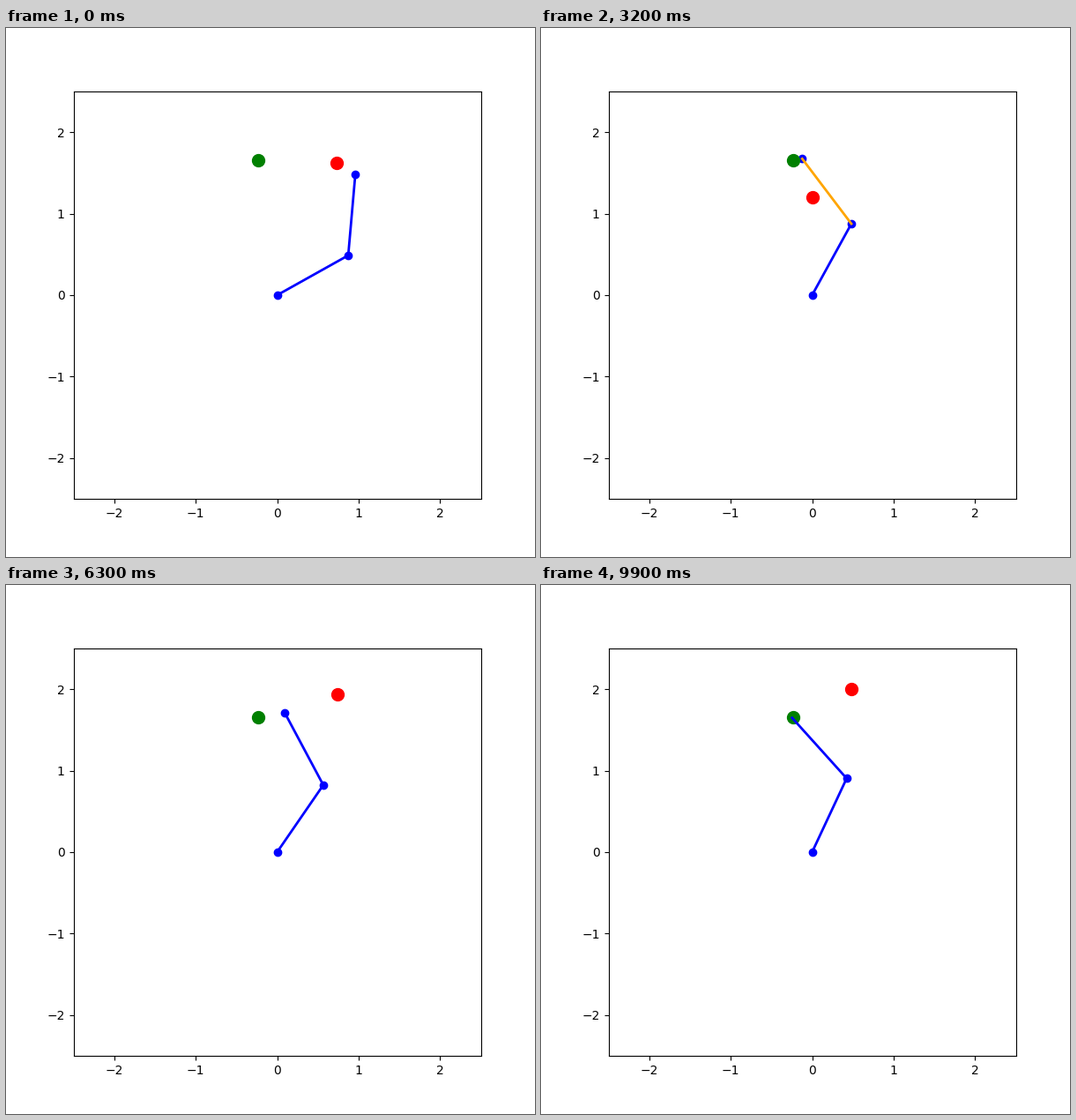
Write a matplotlib script that moves like this. It is 600 px wide and 600 px high and loops after 10 s.

```python
import numpy as np
import matplotlib.pyplot as plt
from matplotlib.animation import FuncAnimation

FRAMES = 100
GAIN = 0.1           # share of the remaining error closed per step
SAFE_DIST = 0.2      # links closer than this to the obstacle turn orange
GOAL = (-0.233, 1.653)
START_POSE = np.array([29.2, 55.8])
GOAL_POSE = np.array([64.5, 67.1])

# the obstacle drives the arm off course: first step, last step, pose reached
PUSHES = [
    (0, 4, (30.8, 53.7)),
    (27, 32, (61.2, 65.9)),
    (32, 48, (45.7, 55.5)),
    (48, 54, (41.2, 55.5)),
    (76, 82, (67.0, 67.2)),
]

# step and position where the wandering obstacle changes direction
TURNS = np.array([
    (0, 0.730, 1.623), (17, 0.005, 1.003), (32, 0.003, 1.20),
    (48, 0.352, 1.678), (59, 0.88, 2.0), (63, 0.741, 1.937),
    (76, 0.137, 1.667), (82, 0.04, 1.60), (99, 0.482, 2.0),
])


def next_pose(pose, i):
    for first, last, reached in PUSHES:
        if first <= i < last:
            return pose + (np.array(reached) - pose) / (last - i)
    return pose + GAIN * (GOAL_POSE - pose)


def arm_angles():
    poses = [START_POSE]
    for i in range(FRAMES - 1):
        poses.append(next_pose(poses[-1], i))
    return np.radians(poses)


def obstacle_path():
    steps, turns = np.arange(FRAMES), TURNS[:, 0]
    path = np.column_stack([np.interp(steps, turns, xy) for xy in TURNS[:, 1:].T])
    jitter = np.random.default_rng(3).uniform(-0.02, 0.02, path.shape)
    jitter[turns.astype(int)] = 0
    return np.clip(path + jitter, (0, 1), (1, 2))


def arm_points(q):
    heading = np.cumsum(q)
    links = np.column_stack([np.cos(heading), np.sin(heading)])
    return np.vstack([(0, 0), np.cumsum(links, axis=0)])


def segment_dist(p, a, b):
    d = b - a
    t = np.clip(np.dot(p - a, d) / np.dot(d, d), 0, 1)
    return np.hypot(*(a + t * d - p))


angles = arm_angles()
obstacles = obstacle_path()

fig, ax = plt.subplots(figsize=(6, 6), dpi=100)
ax.set_xlim(-2.5, 2.5)
ax.set_ylim(-2.5, 2.5)
ax.set_aspect("equal")

joints, = ax.plot([], [], "bo")
ax.plot(*GOAL, "go", markersize=10)
obstacle, = ax.plot([], [], "ro", markersize=10)
links = [ax.plot([], [], "b-", lw=2)[0] for _ in range(2)]


def update(i):
    pts, obs = arm_points(angles[i]), obstacles[i]
    joints.set_data(pts[:, 0], pts[:, 1])
    obstacle.set_data([obs[0]], [obs[1]])
    for link, a, b in zip(links, pts, pts[1:]):
        link.set_data([a[0], b[0]], [a[1], b[1]])
        link.set_color("orange" if segment_dist(obs, a, b) < SAFE_DIST else "blue")
    return joints, obstacle, *links


anim = FuncAnimation(fig, update, frames=FRAMES, interval=100,
                     init_func=lambda: update(0), repeat=True, repeat_delay=0)
plt.show()
```
